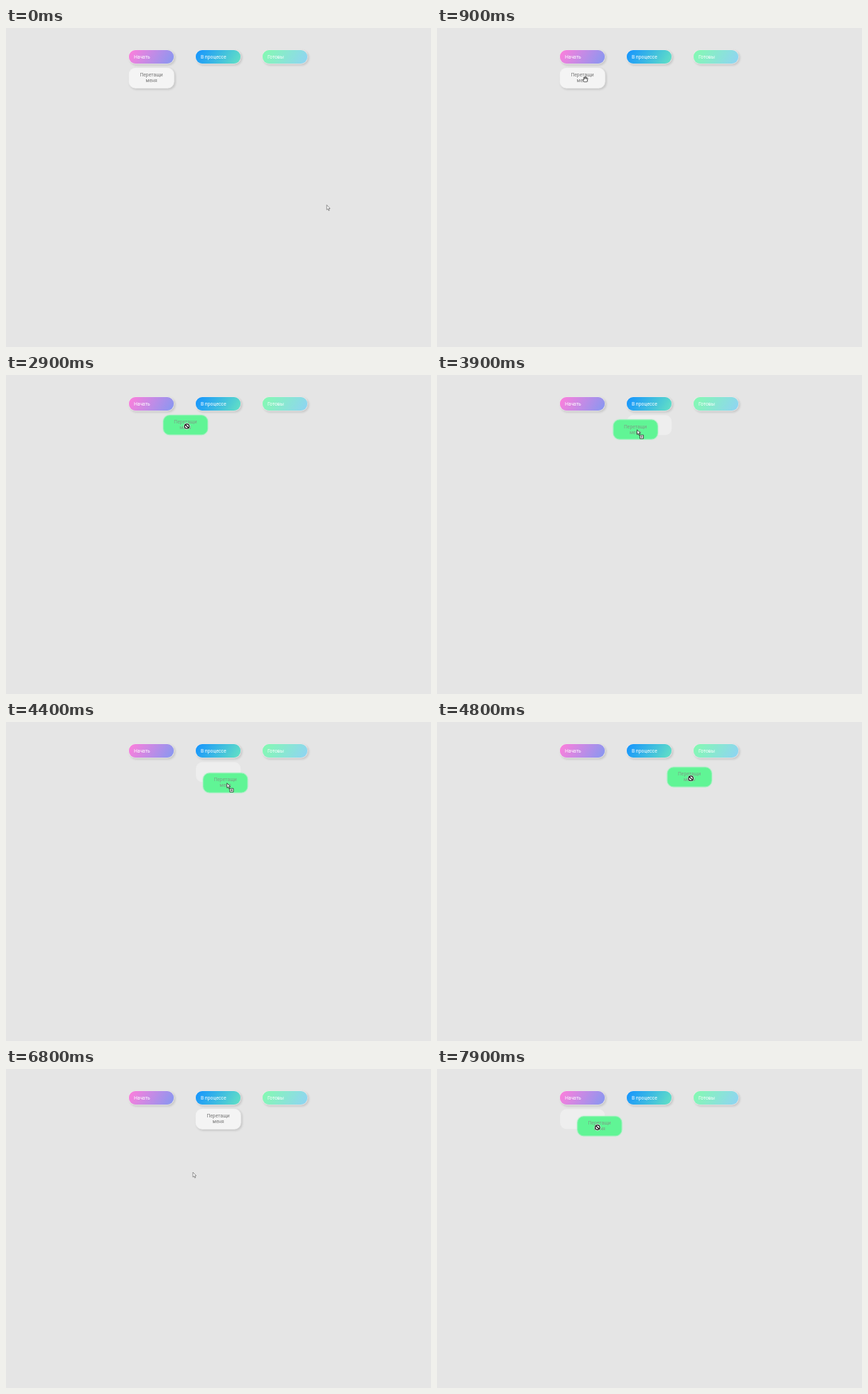
Write an HTML page that moves like this. It is 598 by 448 pixels and loops after 8 s.

```html
<!DOCTYPE html>
<html lang="ru">
<head>
<meta charset="utf-8">
<style>
html, body { margin: 0; width: 100%; height: 100%; overflow: hidden; background: #e5e5e5; }
body { position: relative; font: 6.8px/8px Roboto, sans-serif; }
body > * { position: absolute; left: 0; top: 0; box-sizing: border-box; }
.pill, .card {
  width: 62.7px; border-radius: 9px;
  box-shadow: 0 0 1px .5px #f3f3f3, 1.5px 1.5px 3px 1px #0002;
}
.pill { top: 30.8px; height: 18.8px; padding-left: 6.7px; line-height: 20px; color: #fff; }
.card { height: 27.5px; padding: 6px 12px 0; text-align: center; color: #777; background: #f4f4f4; }
.slot { background: #eee; box-shadow: none; }
.drag {
  padding: 4.5px 11px 0; color: #7b9f86; background: #60f595;
  border: 1px solid #86f3ae; box-shadow: 0 0 1.5px .5px #b9efcd;
}
svg { overflow: visible; width: 1px; height: 1px; }
</style>
</head>
<body>
<div class="pill" style="left:173.2px;background:linear-gradient(120deg,#ff7edb,#8598f1)">Начать</div>
<div class="pill" style="left:267.2px;background:linear-gradient(120deg,#1593ff,#64e2c4)">В процессе</div>
<div class="pill" style="left:361.2px;background:linear-gradient(120deg,#84fab0,#8fd3f4)">Готовы</div>
<div class="card slot" id="slot"></div>
<div class="card" id="card">Перетащи меня</div>
<div class="card drag" id="drag">Перетащи меня</div>
<svg id="cursor" fill="#fff" stroke="#444" stroke-width=".8" stroke-linejoin="round">
  <defs><path id="tip" d="M0 0V6.8L1.6 5.4 2.7 8 3.8 7.5 2.7 5H4.7Z"/></defs>
  <g id="arrow"><use href="#tip" stroke="#666" stroke-width=".7"/></g>
  <g id="open"><path d="M-2 3.6L-3.8 .5-3 0-2 .8-2.6-2.6-1.7-2.8-1-.8V-3.6H0V-.8L.8-3.2 1.7-3V-.4L2.6-2 3.3-1.6 2.5 2 1.8 3.6Z"/></g>
  <g id="fist"><circle r="2.7" stroke-width="1.1" fill="#eee"/></g>
  <g id="deny">
    <circle r="3.3" fill="none" stroke="#fff" stroke-width="2.3"/>
    <circle r="3.2" stroke="#111" stroke-width="1.3"/>
    <path d="M-2.2-2.2 2.2 2.2" stroke="#111" stroke-width="1.3"/>
  </g>
  <g id="copy" transform="translate(.3 -1.5)">
    <use href="#tip" stroke="#222"/>
    <path d="M4 7.5H9V12.5H4Z" stroke="#222"/>
    <path d="M5 10H8M6.5 8.5V11.5" stroke="#222" stroke-width=".7"/>
  </g>
</svg>
<script>
const el = id => document.getElementById(id);
const loop = 80; // all times are in tenths of a second
const cardTop = 56.3, cardWidth = 62.7, cardHeight = 27.5;
const columnLeft = column => 173.2 + 94 * column;

const home = { x: 451.3, y: 248.5 };
const moves = [ // start, end, x, y
  [1, 5, 212, 72],
  [7, 13, 205.7, 72.2],
  [21, 29, 254.5, 72],
  [29, 30, 275, 59],
  [30, 33, 273, 74],
  [34, 40, 281.5, 78.5],
  [41, 45, 313, 88],
  [45, 51, 375.5, 75.5],
  [57, 63, 307, 70],
  [66, 68, 263, 145],
  [68, 75, 174, 33],
  [75, 76, 296, 73],
  [76, 79.5, 224, 82.3]
];
const drags = [
  { column: 0, press: 20, lift: 22, drop: 65, grip: 33.4 },
  { column: 1, press: 76, lift: 77, drop: loop, grip: 28.5 }
];

function pointerAt(tick) {
  let { x, y } = home;
  for (const [start, end, toX, toY] of moves) {
    const k = Math.min(Math.max((tick - start) / (end - start), 0), 1);
    const eased = Math.sin(k * Math.PI / 2);
    x += (toX - x) * eased;
    y += (toY - y) * eased;
  }
  return { x, y };
}

const columnAt = x => [0, 1, 2].find(c => x > columnLeft(c) && x < columnLeft(c) + cardWidth);

function place(id, x, y, visible = true) {
  el(id).style.transform = `translate(${x}px, ${y}px)`;
  el(id).style.display = visible ? "" : "none";
}

function cursorAt(tick, drag, { x, y }) {
  // The drop feedback lags one step behind the pointer
  if (tick >= drag.lift) return columnAt(pointerAt(tick - 1).x) === undefined ? "deny" : "copy";
  if (tick >= drag.press) return "fist";
  const overCard = columnAt(x) === drag.column && y > cardTop && y < cardTop + cardHeight;
  return overCard ? "open" : "arrow";
}

function draw() {
  const tick = Math.floor(performance.now() / 100) % loop;
  const drag = drags.find(d => tick < d.drop);
  const pointer = pointerAt(tick);
  const lifted = tick >= drag.lift;
  const target = columnAt(pointer.x);
  const cursor = cursorAt(tick, drag, pointer);
  place("card", columnLeft(drag.column), cardTop, !lifted);
  place("slot", columnLeft(target ?? 0), cardTop, lifted && target !== undefined);
  place("drag", pointer.x - drag.grip, pointer.y - 15.8, lifted);
  place("cursor", pointer.x, pointer.y);
  for (const shape of el("cursor").querySelectorAll("g"))
    shape.style.display = shape.id === cursor ? "" : "none";
  requestAnimationFrame(draw);
}
draw();
</script>
</body>
</html>
```
